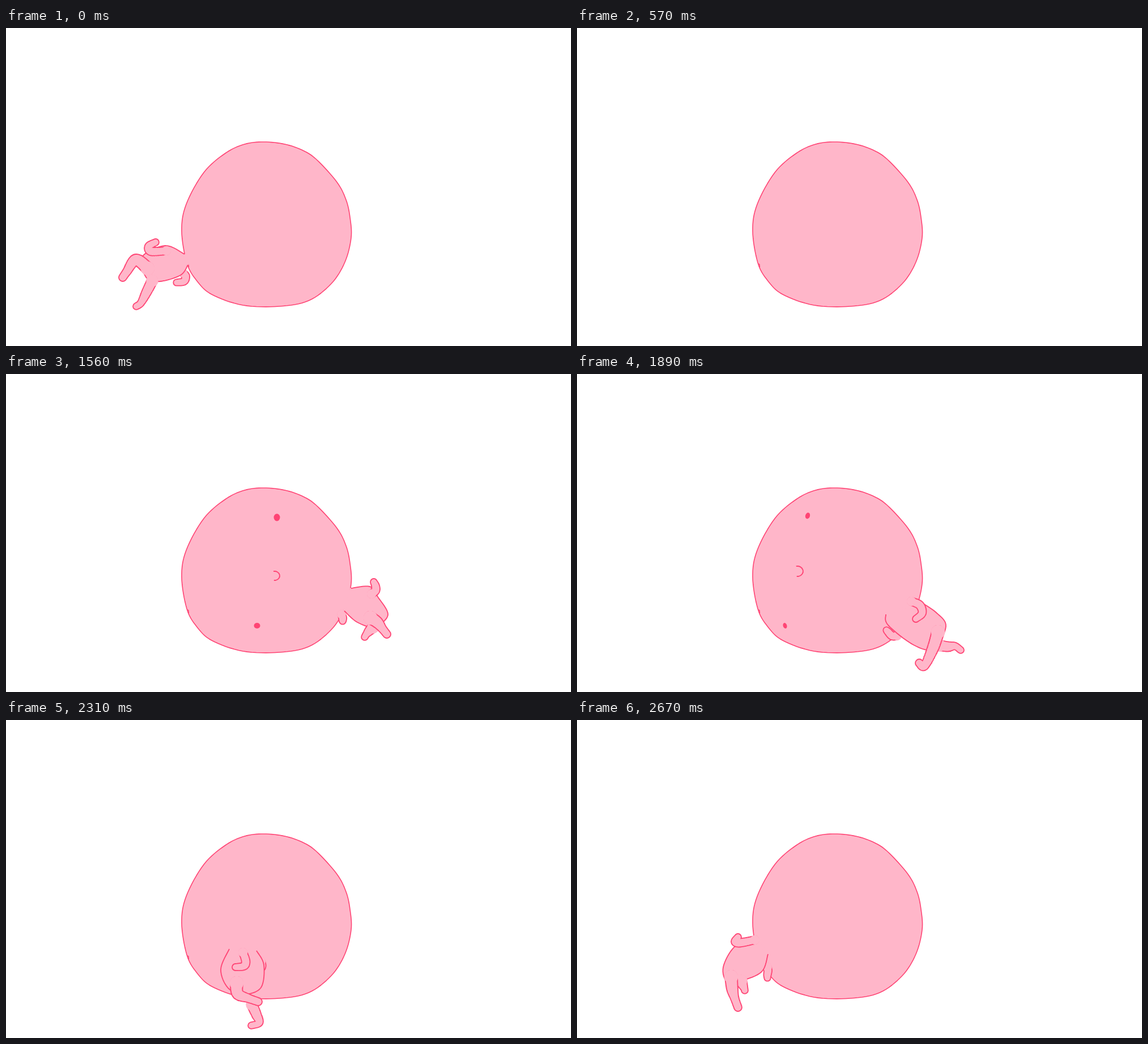
Recreate the animation shown at these times as an HTML page with a canvas. Size 997x561 px, loop 2.73 s.

```html
<!DOCTYPE html>
<html lang="en">
<head>
<meta charset="utf-8">
<title>Rolling head</title>
<style>
  html, body { margin: 0; width: 100%; height: 100%; overflow: hidden; background: #fff; }
  canvas { display: block; }
</style>
</head>
<body>
<canvas id="stage" width="997" height="561"></canvas>
<script>
const ctx = document.getElementById('stage').getContext('2d');
const LOOP = 2730, STEP = 70, TICK = 30;
const SKIN = '#ffb6c9', LINE = '#ff4474', PEN = 1.8;

const points = text => text.split(' ').map(p => p.split(',').map(Number));
const mix = (a, b, u) => a + (b - a) * u;
const mixAll = (a, b, u) => a.map((v, i) => Array.isArray(v) ? mixAll(v, b[i], u) : mix(v, b[i], u));
const shift = (pose, dx, dy) => pose.map(part => part.map(([x, y]) => [x + dx, y + dy]));
const pose = (...parts) => parts.map(points);

const head = points('455,201 492,205 524,216 549,233 584,272 600,303 607,334 609,370 598,413 574,451 ' +
  '534,481 482,491 418,489 363,470 336,445 319,414 310,358 318,311 349,255 387,221 421,205');

// A pose: torso from neck to neck, then the joints of far arm, far leg, near leg, near arm
const left = pose(
  '321,418 308,436 272,447 248,441 240,404 281,384 315,399',
  '312,432 317,438 314,447 301,449',
  '258,446 248,466 238,485 230,491',
  '250,424 229,409 213,430 206,440',
  '283,393 256,394 252,385 264,378');
const right = pose(
  '609,378 642,375 656,393 674,425 650,446 620,438 597,418',
  '592,424 594,430 594,434 594,436',
  '648,447 642,452 636,459 633,464',
  '643,430 655,438 664,449 672,459',
  '645,388 652,382 652,374 649,367');
const crawl = pose(
  '606,402 634,421 651,445 630,485 594,478 549,443 545,424',
  '565,462 556,462 549,455 546,452',
  '640,479 655,481 667,480 677,487',
  '637,455 628,484 613,515 604,510',
  '590,401 605,408 609,422 598,432');
const front = pose(
  '442,407 455,432 450,472 420,484 392,473 379,440 394,404',
  '450,426 451,430 452,434 452,437',
  '434,502 442,520 447,534 433,539',
  '407,464 409,483 428,491 445,497',
  '418,410 423,425 420,434 405,436');
const hang = pose(
  '337,413 326,444 290,460 265,462 258,436 278,400 313,384',
  '336,436 337,442 336,450 336,455',
  '290,460 292,466 295,473 296,477',
  '272,453 274,474 278,490 284,507',
  '314,388 288,393 279,391 284,383');

const legWidths = [11, 10, 7.5, 7], armWidths = [7, 7.5, 7, 6];

// Keys: [step, value, easing power towards the next key]
const bodyKeys = [
  [0, left], [8, shift(left, 150, -40)],
  [16, shift(right, -120, 0)], [22, right], [27, crawl], [33, front], [38, hang], [39, left]
];

// Mouth, upper eye, lower eye as x, y, rx, ry, angle
const faceKeys = [
  [16, [[600, 361, 7, 13, 0], [576, 264, 0, 6, -.4], [580, 433, 2.6, 8, .6]]],
  [22, [[474, 356, 9, 8, 0], [478, 253, 5.5, 6.5, 0], [443, 444, 5.5, 5, 0]], 1.6],
  [27, [[389, 348, 10, 9, 0], [407, 250, 4, 5.6, .3], [367, 444, 3.4, 5, -.3]]],
  [32, [[332, 345, 6, 8, 0], [362, 250, 2, 5.5, .5], [336, 440, 1.5, 5, -.5]]]
];

function sample(keys, k) {
  const i = keys.findIndex((key, n) => !keys[n + 1] || k < keys[n + 1][0]);
  const [start, a, power = 1] = keys[i];
  const [end, b] = keys[i + 1];
  return mixAll(a, b, 1 - Math.pow(1 - (k - start) / (end - start), power));
}

// Point of a smooth curve through pts, u from 0 to the last index
function along(pts, u, closed) {
  const n = pts.length, i = Math.floor(u), f = u - i;
  const at = j => pts[closed ? (j + n) % n : Math.min(n - 1, Math.max(0, j))];
  const [a, b, c, d] = [at(i - 1), at(i), at(i + 1), at(i + 2)];
  return b.map((v, j) => v + f / 2 * (c[j] - a[j] +
    f * (2 * a[j] - 5 * v + 4 * c[j] - d[j] + f * (3 * (v - c[j]) + d[j] - a[j]))));
}

function curve(pts, closed) {
  const end = closed ? pts.length : pts.length - 1;
  return Array.from({ length: end * 8 + 1 }, (_, i) => along(pts, i / 8, closed));
}

function trace(line) {
  ctx.beginPath();
  line.forEach(([x, y]) => ctx.lineTo(x, y));
}

function fill(color) {
  ctx.fillStyle = color;
  ctx.fill();
}

function ink(color, width) {
  ctx.strokeStyle = color;
  ctx.lineWidth = width;
  ctx.stroke();
}

function drawHead() {
  trace(curve(head, true));
  fill(SKIN);
  ink(LINE, 1.6);
  trace([[320, 416], [322, 417], [322.5, 422]]);
  ink(LINE, 1.4);
}

// The open neck blends into the head
function drawTorso(pts) {
  const line = curve(pts);
  trace(line);
  fill(SKIN);
  trace([line[0], line[line.length - 1]]);
  ink(SKIN, 4);
  trace(line);
  ink(LINE, PEN);
}

// A chain of discs, outlined as one shape and open at its root
function drawLimb(joints, widths, scale) {
  const discs = curve(joints.map(([x, y], i) => [x, y, widths[i] * scale]));
  const stamp = (list, grow) => {
    ctx.beginPath();
    for (const [x, y, r] of list) {
      ctx.moveTo(x + r + grow, y);
      ctx.arc(x, y, r + grow, 0, Math.PI * 2);
    }
  };
  stamp(discs, PEN / 2);
  fill(LINE);
  stamp(discs, -PEN / 2);
  fill(SKIN);
  stamp(discs.slice(0, 1), 1.3);
  fill(SKIN);
}

function drawBody(k) {
  const [torso, farArm, farLeg, nearLeg, nearArm] = sample(bodyKeys, k);
  // The near leg kicks outwards while the body turns to the front
  const kick = k > 22 && k < 27 ? 75 * Math.sin((k - 22) / 5 * Math.PI) : 0;
  drawLimb(farArm, armWidths, .95);
  drawTorso(torso);
  drawLimb(farLeg, legWidths, .85);
  drawLimb(nearLeg.map(([x, y], i) => [x + kick * i / 3, y]), legWidths, 1);
  drawLimb(nearArm, armWidths, 1);
}

function drawFace([mouth, ...eyes]) {
  ctx.beginPath();
  ctx.ellipse(...mouth, -1.8, 1.7);
  ink(LINE, PEN);
  for (const eye of eyes) {
    ctx.beginPath();
    ctx.ellipse(...eye, 0, Math.PI * 2);
    fill(LINE);
  }
}

function draw(time) {
  const k = Math.floor(Math.floor((time % LOOP) / TICK) * TICK / STEP);
  const inFront = k === 0 || k >= 20;
  const hidden = k >= 8 && k <= 16;

  ctx.fillStyle = '#fff';
  ctx.fillRect(0, 0, 997, 561);
  ctx.lineJoin = 'round';
  if (!inFront && !hidden) drawBody(k);
  drawHead();
  if (k >= 16 && k < 32) drawFace(sample(faceKeys, k));
  if (inFront) drawBody(k);
}

const begin = performance.now();
function loop() {
  draw(performance.now() - begin);
  requestAnimationFrame(loop);
}
loop();
</script>
</body>
</html>
```
